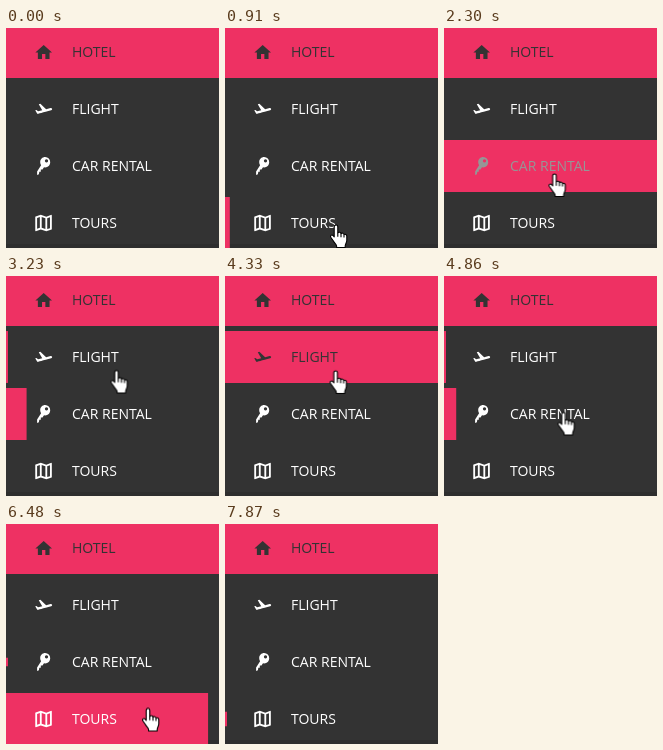
Write an HTML page that moves like this. It is 213 px wide and 220 px high and loops after 7940 ms.

```html
<!DOCTYPE html>
<html lang="en">
<head>
<meta charset="utf-8">
<title>Travel menu</title>
<style>
  html, body { margin: 0; width: 100%; height: 100%; overflow: hidden; background: #333; }
  svg { display: block; width: 213px; height: 220px; }
  text { font: 14px "Open Sans", sans-serif; fill: currentColor; }
  path { fill: currentColor; }
  .item { color: #fff; }
  .active { color: #333; }
  .pink { fill: #ee3163; }
  .bar { transform-box: fill-box; transform-origin: left center; }
  .bar, .item, .cursor { animation: 7.94s linear infinite both; }
  .hand { fill: #fff; stroke: #000; stroke-width: 1.1; stroke-linejoin: round; }

  /* Bars: a thin line grows in height, then sweeps across; reversed on leave. */
  .flight .bar { animation-name: flight-bar; }
  .car .bar { animation-name: car-bar; }
  .tours .bar { animation-name: tours-bar; }
  .flight { animation-name: flight-ink; }
  .car { animation-name: car-ink; }
  .tours { animation-name: tours-ink; }
  .cursor { animation-name: cursor; }

  @keyframes flight-bar {
    0%, 35.894% { transform: scale(.0094, 0); animation-timing-function: ease; }
    40.932% { transform: scale(.0094, 1); animation-timing-function: cubic-bezier(1, 0, 0, 1); }
    45.97%, 56.171% { transform: scale(1, 1); animation-timing-function: cubic-bezier(1, 0, 0, 1); }
    61.209% { transform: scale(.0094, 1); animation-timing-function: ease; }
    64.987%, 100% { transform: scale(.0094, 0); }
  }
  @keyframes car-bar {
    0%, 18.262% { transform: scale(.0094, 0); animation-timing-function: ease; }
    23.3% { transform: scale(.0094, 1); animation-timing-function: cubic-bezier(1, 0, 0, 1); }
    28.338%, 37.531% { transform: scale(1, 1); animation-timing-function: cubic-bezier(1, 0, 0, 1); }
    42.569% { transform: scale(.0094, 1); animation-timing-function: ease; }
    46.348%, 54.66% { transform: scale(.0094, 0); animation-timing-function: ease; }
    59.698% { transform: scale(.0094, 1); animation-timing-function: cubic-bezier(1, 0, 0, 1); }
    64.736%, 74.559% { transform: scale(1, 1); animation-timing-function: cubic-bezier(1, 0, 0, 1); }
    79.597% { transform: scale(.0094, 1); animation-timing-function: ease; }
    83.375%, 100% { transform: scale(.0094, 0); }
  }
  @keyframes tours-bar {
    0%, 5.542% { transform: scale(.0094, 0); animation-timing-function: ease; }
    10.579% { transform: scale(.0094, 1); animation-timing-function: cubic-bezier(1, 0, 0, 1); }
    15.617%, 19.899% { transform: scale(1, 1); animation-timing-function: cubic-bezier(1, 0, 0, 1); }
    24.937% { transform: scale(.0094, 1); animation-timing-function: ease; }
    28.715%, 73.111% { transform: scale(.0094, 0); animation-timing-function: ease; }
    78.149% { transform: scale(.0094, 1); animation-timing-function: cubic-bezier(1, 0, 0, 1); }
    83.186%, 92.632% { transform: scale(1, 1); animation-timing-function: cubic-bezier(1, 0, 0, 1); }
    97.67% { transform: scale(.0094, 1); animation-timing-function: ease-out; }
    100% { transform: scale(.0094, .11); }
  }

  /* Labels and icons darken once the bar is full. */
  @keyframes flight-ink {
    0%, 45.97% { color: #fff; animation-timing-function: ease; }
    46.599%, 54.534% { color: #333; animation-timing-function: ease; }
    56.171%, 100% { color: #fff; }
  }
  @keyframes car-ink {
    0%, 28.338% { color: #fff; animation-timing-function: ease; }
    30.479%, 35.894% { color: #333; animation-timing-function: ease; }
    37.531%, 64.736% { color: #fff; animation-timing-function: ease; }
    66.121%, 72.922% { color: #333; animation-timing-function: ease; }
    74.559%, 100% { color: #fff; }
  }
  @keyframes tours-ink {
    0%, 15.617% { color: #fff; animation-timing-function: ease; }
    16.751%, 18.262% { color: #333; animation-timing-function: ease; }
    19.899%, 83.186% { color: #fff; animation-timing-function: ease; }
    85.642%, 90.995% { color: #333; animation-timing-function: ease; }
    92.632%, 100% { color: #fff; }
  }

  @keyframes cursor {
    0%, 5.542% { transform: translate(140px, 223px); }
    7.305%, 18.262% { transform: translate(111px, 197px); }
    19.27%, 35.894% { transform: translate(110.5px, 146px); }
    37.154%, 54.534% { transform: translate(110.5px, 94.5px); }
    55.793%, 72.922% { transform: translate(119.5px, 136.5px); }
    74.307%, 89.421% { transform: translate(142px, 184.5px); }
    91.436%, 100% { transform: translate(150px, 223px); }
  }
</style>
</head>
<body>
<svg viewBox="0 0 213 220">
  <rect width="213" height="220" fill="#333"/>
  <rect y="216" width="213" height="4" fill="#2e2e2e"/>

  <g class="active">
    <rect class="pink" width="213" height="50"/>
    <path transform="translate(27.7 14.4) scale(.833)" d="M10 20v-6h4v6h5v-8h3L12 3 2 12h3v8z"/>
    <text x="66" y="29">HOTEL</text>
  </g>

  <g class="item flight">
    <rect class="pink bar" y="55" width="213" height="52"/>
    <path transform="translate(27.7 72.8) scale(.833)" d="M22.07 9.64c-.21-.8-1.04-1.28-1.84-1.06L14.92 10l-6.9-6.43-1.93.51 4.14 7.17-4.97 1.33-1.97-1.54-1.45.39 2.59 4.49s7.12-1.9 16.57-4.43c.81-.23 1.28-1.05 1.07-1.85z"/>
    <text x="66" y="86">FLIGHT</text>
  </g>

  <g class="item car">
    <rect class="pink bar" y="112" width="213" height="52"/>
    <path fill-rule="evenodd" d="M39.2 129a5 5 0 0 1 5 5.2c0 3-2.2 5.2-5 5.2l-1.2-.1-1.5 2.2h-1.7v2.2h-1.5l-.4 2.5-1.8.8v-3.4l4-6.4a5.2 5.2 0 0 1-.9-3c0-3 2.200-5.200 5-5.200zM40.500 131.300a1.600 1.600 0 1 0 .01 0z"/>
    <text x="66" y="143">CAR RENTAL</text>
  </g>

  <g class="item tours">
    <rect class="pink bar" y="169" width="213" height="52"/>
    <path fill-rule="evenodd" transform="translate(26.500 184) scale(.92)" d="M20.500 3L15 5.100 9 3 3.360 4.900Q3 5 3 5.380V20.500Q3 21 3.660 20.970L9 18.900 15 21l5.640-1.900Q21 19 21 18.620V3.500Q21 3 20.500 3zM10 5.470l4 1.400v11.660l-4-1.400zM5 6.460l3-1.010v11.700l-3 1.160zM19 17.540l-3 1.010V6.860l3-1.160z"/>
    <text x="66" y="200">TOURS</text>
  </g>

  <g class="cursor">
    <path class="hand" d="M-1.800 1.800a1.800 1.800 0 0 1 3.600 0v6c.8-1 3-.6 3.200.8.9-.9 2.800-.5 3 .9 1-.6 2.800-.2 2.800 1.600v4.400c0 2-1.600 3.400-1.600 5.600v1.400H.6v-1.400c0-1.800-2.300-3-3.400-5.400l-2.400-3.400c-.9-1.600 1-2.900 2.200-1.800l1.200 1.400z"/>
    <path class="hand" d="M1.800 7.800v4M5 8.600v3.600M8 9.500v3"/>
  </g>
</svg>
</body>
</html>
```
